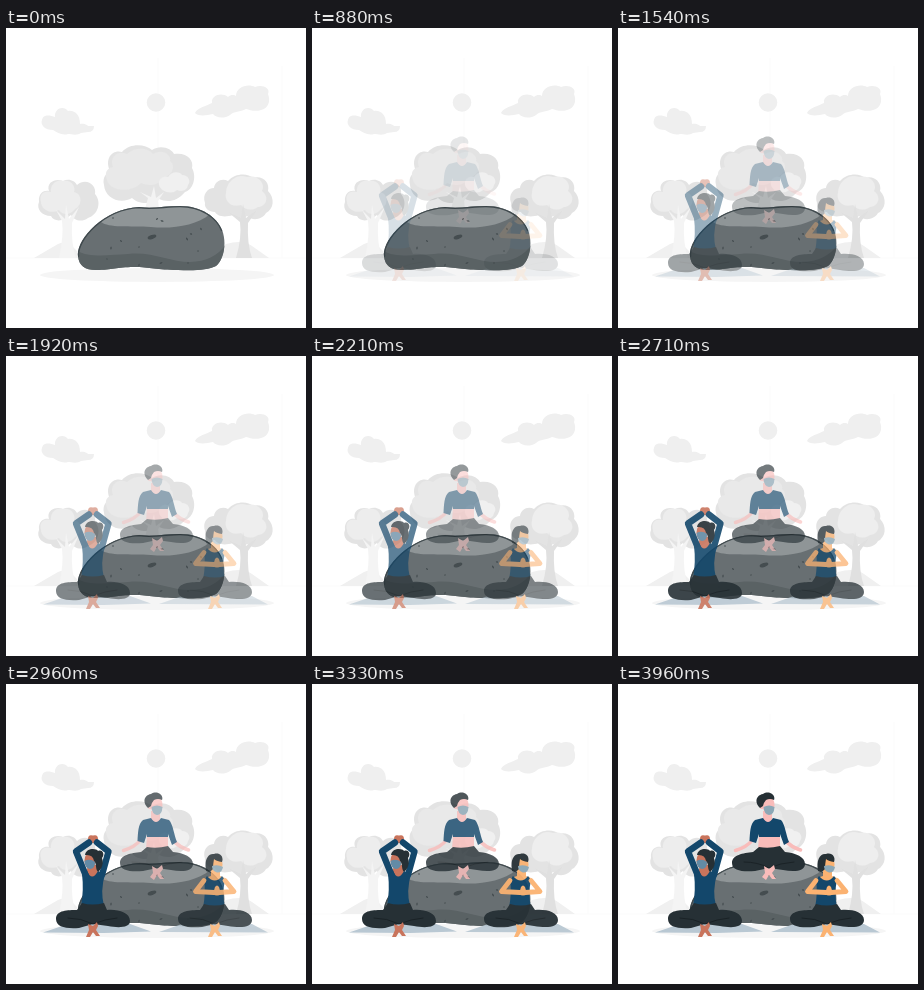
These frames come from a looping animation (300x300 px, 4.04 s). An HTML page:

```html
<!DOCTYPE html>
<html lang="en">
<head>
<meta charset="utf-8">
<title>Outdoor yoga</title>
<style>
html, body { margin: 0; width: 100%; height: 100%; overflow: hidden; background: #fff; }
svg { display: block; width: 100vw; height: 100vh; }
.line { fill: none; stroke-linecap: round; stroke-linejoin: round; }
.navy { fill: #13476b; }
.dark { fill: #263035; }
.mask { fill: #8ba7b6; }
.mat { fill: #b9c8d3; }
.crown { fill: #e3e3e3; }
</style>
</head>
<body>
<svg viewBox="0 0 300 300">
  <!-- sky and park -->
  <g fill="#efefef">
    <path d="M0 230H300M152 30V180M276 38V230" stroke="#fafafa" stroke-width=".7"/>
    <circle cx="150" cy="74.500" r="9.300"/>
    <path d="M36 92C37 86 44 87 49 89C48 80 58 77 62 83C69 82 74 87 74 96C79 95 82 98 82 98L88 98Q88 104 82 104L75 105C71 108 65 106 62 106C56 108 51 104 47 102C39 102 34 97 36 92Z"/>
    <path d="M189 85C191 80 200 78 206 75C205 67 216 64 222 69C225 66 229 67 230 68C230 59 242 55 249 59C256 56 265 60 262 66C265 73 262 81 255 82C249 84 244 82 240 81C234 84 228 83 224 87C218 91 210 90 207 86C199 88 191 88 189 85Z"/>
  </g>
  <path d="M28 230L52 216Q59 212 66 218L78 230ZM202 230L220 216Q237 211 246 218L263 230Z" fill="#f0f0f0"/>
  <ellipse cx="151" cy="247" rx="117" ry="7" fill="#f5f5f5"/>

  <!-- side trees -->
  <path class="crown" d="M33 174C32 164 39 162 43 163C40 154 50 150 57 153C63 150 69 153 71 157C80 149 91 157 89 166C96 174 92 187 82 190C75 195 68 192 65 187C57 194 48 194 45 188C36 188 30 181 33 174Z"/>
  <path d="M35 174C33 166 38 162 45 164C44 157 50 151 57 153C66 151 70 160 68 164C77 166 76 178 69 181C64 188 56 187 53 182C44 187 35 181 35 174Z" fill="#ededed"/>
  <path d="M53 230Q58 207 56 193L50 182L59 191L60 177L63 191L73 179L66 195Q65 216 70 230Z" fill="#f4f4f4"/>
  <path class="crown" d="M199 175C196 166 202 160 208 160C209 153 216 150 222 153C229 145 242 145 247 150C257 147 264 155 262 163C269 170 268 181 260 185C256 192 246 193 241 188C235 193 229 190 227 187C218 190 211 188 209 184C203 184 198 180 199 175Z"/>
  <path d="M220 165C220 154 231 145 241 149C252 146 260 156 256 163C264 169 260 179 252 179C245 184 238 181 235 177C225 180 218 173 220 165Z" fill="#eee"/>
  <path d="M230 230Q236 210 234 194L222 184L235 190L237 176L240 190L251 182L242 195Q241 216 246 230Z" fill="#e0e0e0"/>

  <!-- middle tree -->
  <path class="crown" d="M98 157C96 149 101 145 104 143C98 130 107 121 116 124C124 115 139 116 146 122C155 116 166 121 168 126C181 124 188 132 186 140C191 149 187 162 179 164C170 175 160 174 153 171C143 178 131 175 126 170C114 177 99 170 98 157Z"/>
  <path d="M101 152C98 145 101 140 107 139C103 129 112 122 121 126C129 118 143 120 147 126C156 120 166 127 164 133C171 139 165 148 157 150C151 160 139 157 135 155C126 165 104 164 101 152Z" fill="#e9e9e9"/>
  <path d="M139 181L142 170L134 164L145 169L148 158L150 170L158 164L152 173L153 182Z" fill="#f3f3f3"/>
  <path d="M153 157C152 150 158 148 162 149C165 143 174 143 176 147C183 147 185 154 182 157C181 163 175 164 171 162C166 167 155 164 153 157Z" fill="#f0f0f0"/>

  <!-- rock -->
  <clipPath id="edge"><path d="M72 228C70 213 96 181 133 179C147 181 159 178 174 178C195 178 211 189 216 202C221 214 218 232 210 238C202 242 188 243 172 242C151 242 144 239 128 239C110 239 107 242 90 242C79 242 73 238 72 228Z"/></clipPath>
  <g clip-path="url(#edge)">
    <path d="M60 170H230V250H60Z" fill="#686f72"/>
    <path d="M95 194C103 200 123 198 145 199C166 201 190 198 204 186L190 170H110Z" fill="#8f9597"/>
    <path d="M70 222C82 230 102 227 122 226C145 223 164 234 184 234C201 234 214 226 220 216V250H70Z" fill="#5a6264"/>
    <path d="M72 228C70 213 96 181 133 179C147 181 159 178 174 178C195 178 211 189 216 202" class="line" stroke="#3f494d" stroke-width="2.600"/>
    <g id="specks" fill="#454d50">
      <ellipse cx="146" cy="209" rx="4.500" ry="2" transform="rotate(-18 146 209)"/>
    </g>
  </g>

  <!-- arms raised -->
  <g id="left" opacity="0">
    <path class="mat" d="M37 248.500L62 240H124L145 247.500L98 249Z"/>
    <g fill="#c9745c">
      <path d="M82 155Q82 150 87 151.500Q92 150 92 155L90 159H84Z"/>
      <path d="M82 181H91L92 190Q86 200 80 190Z"/>
      <ellipse cx="84" cy="176.500" rx="5.500" ry="8"/>
    </g>
    <path class="line" d="M83 158.500L70 167.500L80 192M91 158.500L102.500 167.500L96 191" stroke="#13476b" stroke-width="6.400"/>
    <path class="navy" d="M76 190L81 187Q86 198 92 187L99 190Q94 207 98 222H75Q78 206 76 190Z"/>
    <path class="dark" d="M79 171C80 164 90 164 92 167C97 165 99 171 96 174C98 179 96 185 92 188C89 185 91 179 88 177Q87 170 79 171Z"/>
    <path class="mask" style="fill:#638ba6" d="M78.500 177Q84 174 89 178Q89 185 84 185Q79 184 78.500 177Z"/>
    <path class="dark" d="M76 219Q86 222 98 219L101 226C111 225 124 228 124 237C124 244 112 244 102 242L87 240L73 244C60 245 50 243 50 235C50 226 62 226 71 226Z"/>
    <path class="line" d="M62 234Q75 234 87 240Q99 235 111 234" stroke="#1a2226"/>
    <path d="M82 240L87 242L91 238L92 242L90 246L94 252H90L87 248L84 253H80L83 246Z" fill="#c9745c"/>
  </g>

  <!-- hands at the chest -->
  <g id="right" opacity="0">
    <path class="mat" d="M153 248L176 240H246L262 248.500Z"/>
    <g fill="#fbb271">
      <path d="M205 185H214V192L219 194Q209 204 199 194L205 192Z"/>
      <ellipse cx="211" cy="180.500" rx="5.500" ry="7.500"/>
    </g>
    <path class="dark" d="M200 187C198 176 202 169 208 170C214 168 218 173 216 178Q210 177 208 175Q207 180 207 185Q204 189 200 187Z"/>
    <path class="mask" d="M206 182Q212 180 217 183Q216 189 211 188.500Q206 187 206 182Z"/>
    <path class="navy" d="M198 196L201 192Q209 201 216 192L219 196Q216 209 219 224H197Q200 208 198 196Z"/>
    <path class="line" d="M198 196.500L189.500 207.500L208 208.500M219 196.500L228 207.500L213 208.500" stroke="#fbb271" stroke-width="4.800"/>
    <path d="M207 210L209 203Q211 200 213 203L215 210Q211 213 207 210Z" fill="#fbb271"/>
    <path class="dark" d="M198 220Q209 223 219 220L223 226C234 225 246 228 246 236C246 244 234 244 222 242L209 240L196 243C183 244 172 243 172 235C172 227 184 226 194 226Z"/>
    <path class="line" d="M184 234Q197 234 209 240Q221 235 233 234" stroke="#1a2226"/>
    <path d="M204 240L209 242L213 238L214 242L212 246L216 252H212L209 248L206 253H202L205 246Z" fill="#fbb271"/>
  </g>

  <!-- seated on the rock -->
  <g id="middle" opacity="0">
    <g fill="#f9bcba">
      <path d="M141 149H162V167H140Z"/>
      <path d="M145 127H154V137Q150 143 145 137Z"/>
      <ellipse cx="150.500" cy="121" rx="6" ry="9"/>
      <circle cx="144" cy="123" r="2.200"/>
      <path class="line" d="M134.500 156Q129 163 117.500 166.500M168 157Q173 163 182.500 166" stroke="#f9bcba" stroke-width="3.600"/>
    </g>
    <path class="dark" d="M142 124C136 119 138 111 145 110C151 106 158 111 156 116Q152 114 148 116Q146 118 145 122Z"/>
    <path class="mask" d="M145.500 123Q151 120 156.500 123Q156 131 151 131Q146 130 145.500 123Z"/>
    <path class="navy" d="M137 136L145 134Q150 142 155 134L163 136C167 140 168 151 171 158L166 161L162 150V153H141V150L138 159L131.500 157C132 149 132 140 137 136Z"/>
    <path class="dark" d="M141 163Q151 165 162 162L167 168C178 169 187 173 187 180C187 188 175 188 165 186L151 184L137 187C125 188 114 187 114 179C114 171 125 169 135 168Z"/>
    <path class="line" d="M126 178Q140 178 151 184Q162 179 176 178" stroke="#1a2226"/>
    <path d="M146 182L151 185L156 181L157 185L154 189L158 195H154L151 191L148 196L144 193L147 189Z" fill="#f9bcba"/>
  </g>
</svg>
<script>
const LOOP = 4040, START = 460, STEP = 40;
const fadeEnd = { left: 2960, right: 3460, middle: 3960 };
const el = id => document.getElementById(id);

const specks = [[107, 190], [115, 213], [105, 220], [133, 219], [185, 206], [181, 211],
  [192, 223], [151, 191], [156, 193], [101, 231], [133, 237], [155, 235], [182, 235], [195, 201]];
el("specks").innerHTML += specks.map(([x, y], i) =>
  `<ellipse cx="${x}" cy="${y}" rx="${0.8 + i % 3 * 0.4}" ry=".7" transform="rotate(${i * 47} ${x} ${y})"/>`).join("");

function draw(now) {
  const t = now % LOOP;
  const elapsed = Math.max(0, Math.floor((t - START) / STEP) * STEP);
  for (const id in fadeEnd) {
    const done = t >= fadeEnd[id];
    el(id).setAttribute("opacity", done ? 1 : elapsed / (fadeEnd[id] - START));
  }
  requestAnimationFrame(draw);
}
draw(performance.now());
</script>
</body>
</html>
```
